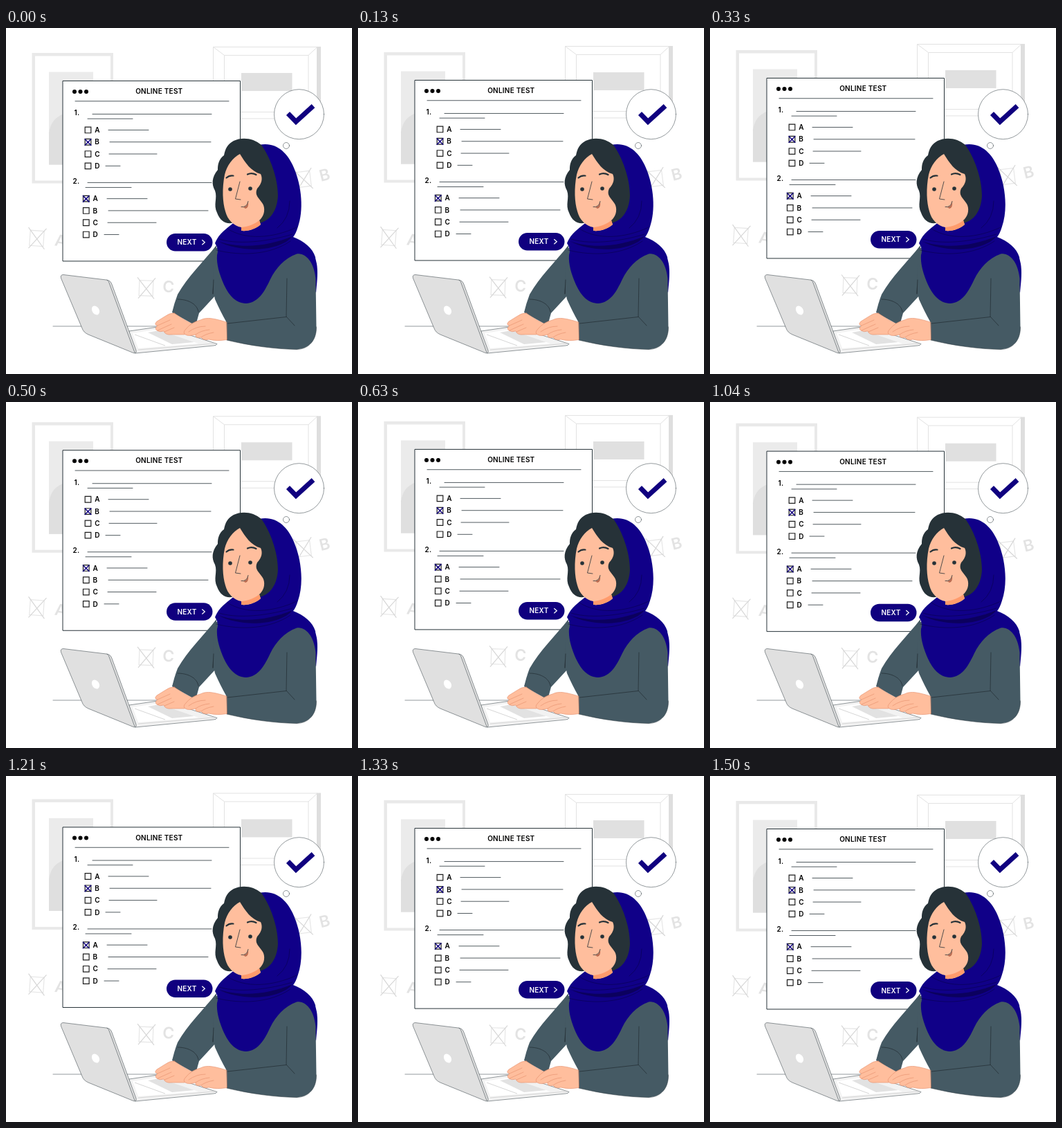
An HTML page that plays this animation: 500 by 500 pixels, repeating every 1.54 s.

```html
<!DOCTYPE html>
<html lang="en">
<head>
<meta charset="utf-8">
<title>Online test</title>
<style>
  html, body { margin: 0; width: 100%; height: 100%; overflow: hidden; background: #fff; }
  svg { display: block; width: 100vw; height: 100vh; }
  text { font: 600 10px Inter, Roboto, sans-serif; letter-spacing: .25px; }
  .ghost text { font-size: 23px; fill: #e3e3e3; }
  .ghost path { fill: none; stroke: #d6d6d6; stroke-width: 1.2; }
  .ghost .box { stroke: #e6e6e6; }
  .line { fill: none; stroke: #263238; stroke-width: .8; stroke-linecap: round; stroke-linejoin: round; }
  .thin { stroke-width: .5; }
  .brow { stroke-width: 2.2; }
  .blue { fill: #10007f; }
  .scarf { fill: #100088; }
  .dark { fill: #263238; }
  .skin { fill: #ffbe9d; }
  .cloth { fill: #455a64; }
</style>
</head>
<body>
<svg viewBox="0 0 500 500">
  <g id="floating">
    <!-- wall pictures -->
    <path fill="#e9e9e9" d="M37.500 36.500H155V225H37.500Z"/>
    <path fill="#fff" d="M42 41H151V221H42Z"/>
    <path fill="#ebebeb" d="M62 64H126V198H62Z"/>
    <path fill="#dfdfdf" d="M62 198V152C65 134 74 126 94 122V198Z"/>
    <path fill="#fff" stroke="#e2e2e2" d="M299.500 28H450V131.500H299.500ZM315.500 40H437V122H315.500ZM299.500 28L315.500 40M450 28L437 40M450 131.500L437 122"/>
    <path fill="#dedede" d="M449 27.500H455V132H449Z"/>
    <path fill="#e0e0e0" d="M340 65.500H413.500V91.500H340Z"/>
    <g id="ghosts" class="ghost"></g>

    <!-- test window -->
    <path fill="#fff" stroke="#263238" d="M82 77H338.500V337.500H82Z"/>
    <circle cx="99" cy="92.500" r="3"/><circle cx="107.500" cy="92.500" r="3"/><circle cx="116" cy="92.500" r="3"/>
    <text x="221.300" y="95.700" text-anchor="middle">ONLINE TEST</text>
    <path class="line" d="M100 106.300H322"/>
    <g id="questions"></g>
    <rect class="blue" x="232" y="297.500" width="66.500" height="25.500" rx="12.750"/>
    <text x="261.500" y="314" text-anchor="middle" fill="#fff">NEXT</text>
    <path fill="none" stroke="#fff" stroke-width="1.200" d="M283.300 306.800L287.300 310.300L283.300 313.800"/>
  </g>

  <!-- thought bubble -->
  <circle class="line thin" cx="423.500" cy="124.700" r="36" style="fill:#fff"/>
  <circle class="line thin" cx="405" cy="170" r="4.500" style="fill:#fff"/>
  <path fill="none" stroke="#10007f" stroke-width="7" d="M407.500 123.500L419 135.300L444 112.700"/>

  <path class="line thin" d="M68 431H240"/>

  <!-- sleeves and body -->
  <path class="cloth" d="M304 314C286 337 262 360 248 385Q243 398 240 411L274 430L279 412L304 385Z"/>
  <path class="line" d="M248 392C262 392 276 398 278 410M301 342L299 384"/>
  <path class="scarf" d="M408 306C430 309 448 324 449.500 344C451 357 449 370 448 383L436 350L404 330Z"/>
  <path class="cloth" d="M303 318C298 350 298 375 302 392Q310 410 318 424L319 451C352 459 388 464 420 464.500C438 463 448 452 448.500 434L447.500 362C445 338 434 326 420 325.500L370 310Z"/>
  <path class="line" d="M406 362L405 417L417 430M405 417.500L320 427M300 364L299 384"/>
  <path class="line thin" d="M319 451C352 459 388 464 420 464.500C438 464 449 451 448.500 432"/>

  <!-- head scarf -->
  <path class="scarf" d="M366 169C390 164 407 180 416 202C428 230 430 264 422 287Q419 297 415 302C431 308 443 318 447 331L449 350C442 332 432 325 420 326.500C402 333 390 347 382 363C373 382 365 396 348 398C333 398 323 388 315 371C308 355 304 341 305 328Q308 320 302 311C306 301 312 295 322 287L350 265Z"/>
  <g class="line" style="stroke:#07003f">
    <path class="thin" d="M308 305C340 315 388 306 414 298M320 290C346 307 386 304 420 288M304 321C340 330 382 328 411 308M392 289Q410 275 410 250"/>
    <path fill="#0b005e" stroke="none" d="M306 308C340 320 380 315 414 301C396 323 340 326 306 308Z"/>
  </g>

  <!-- head -->
  <path class="dark" d="M369 169C358 159 341 157 329 163C320 168 317 174 315 184C307 190 306 198 306 205C297 216 297 226 302 235C306 246 299 255 305 267C309 278 316 283 326 282L350 270L366 282C382 278 392 264 393 242C393 217 382 187 369 169Z"/>
  <path class="skin" d="M338 182C328 187 319 199 316 212C312 232 313 252 317 265C320 277 329 286 340 288V293C351 294 361 290 368 284L366 278C372 273 375 264 372 256C368 247 358 243 363 232C370 225 371 217 368 211C354 207 346 195 338 182Z"/>
  <path fill="#ff9b6c" d="M340 288C351 287 360 283 366 278L368 284C361 290 351 294 340 293Z"/>
  <g class="line">
    <path d="M338 222L331.500 247L339 248"/>
    <path class="brow" d="M318.500 216.500Q323 212.500 328.500 213.500M349 211.500Q355 208.500 361.500 212"/>
    <path fill="#b96a50" stroke="none" d="M343 259Q349 258 350 251Q351 260 346 261Z"/>
    <path d="M340 258.500Q348 260 350 250.500"/>
  </g>
  <circle class="dark" cx="324" cy="233" r="2.800"/>
  <circle class="dark" cx="353" cy="232" r="2.800"/>

  <!-- laptop -->
  <path class="line thin" style="fill:#f2f2f2" d="M178 438L226 431L305 456.500Q304 459 300 459L187 470Z"/>
  <path fill="#fff" d="M183 441L216 436L278 456L191 463Z"/>
  <path fill="#e2e2e2" d="M205 440L222 437L272 454L240 457Z"/>
  <path fill="none" stroke="#d6d6d6" d="M186 443L230 459M191 465L301 456"/>
  <path class="line thin" style="fill:#e0e0e0" d="M79.500 361.500Q78 356.500 83 356.500L145 364Q151 364.500 153 370.500L188 466Q189 471 184 469.500L119 443Q112 440 110 434Z"/>
  <path class="line thin" d="M146 364Q149 366 150 371L186 469"/>
  <ellipse cx="129.500" cy="408" rx="5" ry="7" fill="#fff" transform="rotate(-32 129.500 408)"/>

  <!-- hands -->
  <g class="line" style="stroke:#e58e6b;stroke-width:.6">
    <path class="skin" d="M243 412Q236 412 231 416L218 424Q213 429 219 430Q214 434 218 437Q222 440 228 438Q230 444 239 443L258 443L274 430Q258 423 243 412Z"/>
    <path d="M219 430L237 422M219 437L239 428M229 439L243 433"/>
    <path class="skin" d="M318.500 425C302 420 290 417 281 422Q268 425 260 435Q255 440 259 443Q264 446 274 443Q273 449 282 447Q285 452 293 450Q305 453 319 450.500Z"/>
    <path d="M264 439Q275 431 288 431M274 443Q282 437 294 436M282 447Q288 442 300 440"/>
  </g>
</svg>
<script>
  const PERIOD = 1540, RISE = 8.4, LEAD = 45, REST = -.5;
  const el = id => document.getElementById(id);
  const rule = (x1, x2, y) => `<path class="line" d="M${x1} ${y}H${x2}"/>`;

  const option = (letter, x, y, checked, x1, x2) => `
    <path fill="none" stroke="#1c1c1c" stroke-width="1.200" d="M${x} ${y - 4.3}h8.600v8.600h-8.600Z"/>
    ${checked ? `<path stroke="#10007f" stroke-width="1.500" d="M${x - .5} ${y - 4.5}l9.500 9.500m0 -9.500l-9.500 9.500"/>` : ''}
    <text x="${x + 14}" y="${y + 3.7}">${letter}</text>${rule(x1, x2, y)}`;

  const question = (number, numberX, y, lines, x, optionY, checked, spans) =>
    `<text x="${numberX}" y="${y}">${number}.</text>` + lines.map(l => rule(...l)).join('') +
    spans.map((s, i) => option('ABCD'[i], x, optionY + i * 17.3, i === checked, ...s)).join('');

  el('questions').innerHTML =
    question(1, 98.5, 127, [[125, 297, 125], [118, 183, 131.700]], 114.2, 148, 1,
      [[148, 206], [150, 296], [149, 218], [144, 165]]) +
    question(2, 96.5, 225.500, [[118, 297, 224], [115, 181, 231]], 111.5, 247.2, 0,
      [[146, 204], [148, 292], [147, 217], [142, 163]]);

  const ghost = (letter, boxX, boxY, letterX, letterY, angle) => `
    <g transform="translate(${boxX} ${boxY}) rotate(${angle / 2})">
      <path class="box" d="M-10 -11H10V11H-10Z"/><path d="M-13 -15L12 15M13 -15L-11 15"/>
    </g>
    <text text-anchor="middle" transform="translate(${letterX} ${letterY}) rotate(${angle})" y="8">${letter}</text>`;

  el('ghosts').innerHTML = ghost('A', 44.5, 304.5, 79, 308, 8) +
    ghost('B', 430, 219, 460.5, 213, -14) + ghost('C', 202.5, 376.5, 235, 374.5, 4);

  function draw() {
    const angle = 2 * Math.PI * (performance.now() + LEAD) / PERIOD;
    const y = REST + RISE * (Math.cos(angle) - 1) / 2;
    el('floating').setAttribute('transform', `translate(0 ${y.toFixed(2)})`);
    requestAnimationFrame(draw);
  }
  draw();
</script>
</body>
</html>
```
